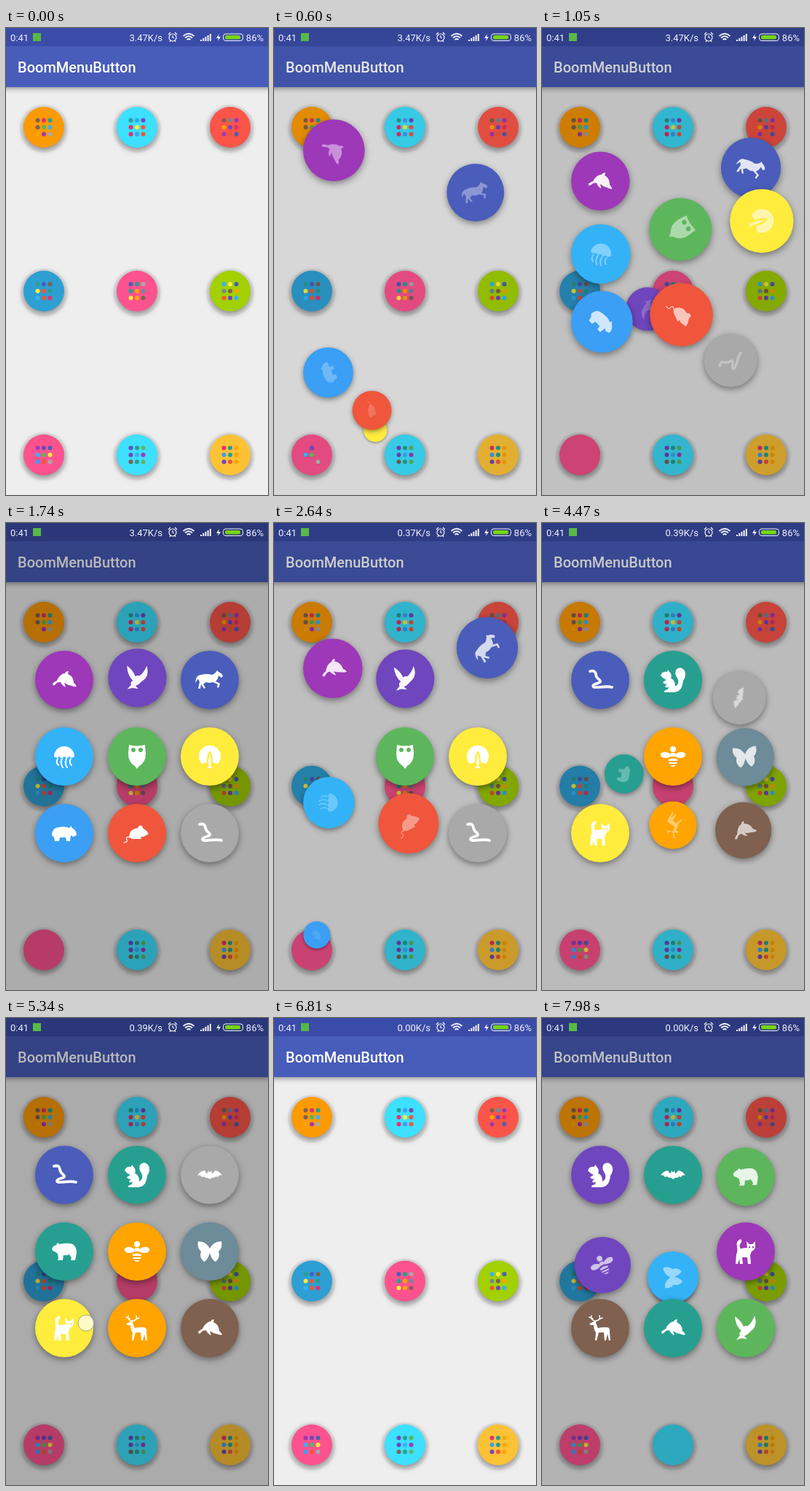
Write an HTML page with a canvas that moves like this. It is 360x640 px and loops after 8000 ms.

```html
<!DOCTYPE html>
<html lang="en">
<head>
<meta charset="utf-8">
<title>Boom menu</title>
<style>
html, body { margin: 0; width: 100%; height: 100%; overflow: hidden; background: #eee; }
canvas { display: block; width: 360px; height: 640px; }
</style>
</head>
<body>
<canvas id="stage"></canvas>
<script>
const LOOP = 8000;
const MAX_DIM = 0.2815;
const canvas = document.getElementById('stage');
const ctx = canvas.getContext('2d');
const ratio = window.devicePixelRatio || 1;
canvas.width = 360 * ratio;
canvas.height = 640 * ratio;

const COLORS = {
  p: '#9d38b8', v: '#7046be', i: '#4a5dbb', l: '#34b2f8', g: '#5db65c', y: '#ffec3d', b: '#3a9ff5',
  r: '#f0563b', a: '#a9a9a9', t: '#279f90', o: '#ffa400', s: '#6d8b98', n: '#80604f', k: '#e4306b'
};

// Each menu button: fill colour and the colours of its nine dots.
const BUTTONS = [
  ['#fc9a05', 'nktnglopa'], ['#3de0ff', 'tbvkyrkbr'], ['#fb5549', 'nspovkpri'],
  ['#2d9fd3', 'tinyrtlrk'], ['#fc538e', 'itatosyon'], ['#a2d000', 'lyisnorvl'],
  ['#fc538e', 'pvilgybra'], ['#3de0ff', 'vtgvlpntg'], ['#fcc236', 'ktobtovro']
].map(([color, dots], n) => ({ color, dots, x: 52 + n % 3 * 128, y: 136 + Math.floor(n / 3) * 224.5 }));

// Each icon: filled outline, stroked outline, stroke width.
const ICONS = {
  dolphin: ['M-17 6Q-13 2-10 1C-7-6-2-9 1-9Q2-12 6-12L5-8C11-6 13 0 13 4Q16 6 17 9Q14 10 10 8Q4 7 0 4L2 10Q-3 8-5 3Q-8 3-10 4Q-12 7-16 8Q-13 5-17 6Z'],
  eagle: ['M-15-16Q-6-10-3-2Q1-4 3-3Q9-8 12-17Q17-3 7 4Q3 9-2 11L2 15-6 14-13 16-8 10Q-10 6-6 4Q-14-3-15-16Z'],
  horse: ['M-20 4Q-19-7-12-7Q-4-9 3-7Q8-9 10-13L12-11Q17-9 18-5L16-3 12-6Q11 0 8 2L14 5 12 11 10 10 11 6 4 3Q0 5-5 3L-9 6-6 11-8 12-12 6-13 12H-16L-14 3Q-16-3-17 0Z'],
  jelly: ['M-14 0A14 14 0 0 1 14 0Q10 3 7 0Q4 4 0 0Q-4 4-7 0Q-10 3-14 0Z',
    'M-9 3Q-12 8-8 12M-3 3Q-6 9-2 15M3 3Q0 9 4 15M9 3Q6 8 10 12', 2],
  owl: ['M-11-16Q0-13 11-16L12-4Q12 8 3 13L0 17-3 13Q-12 8-12-4ZM-8-9a3 3 0 1 0 6 0a3 3 0 1 0-6 0ZM2-9a3 3 0 1 0 6 0a3 3 0 1 0-6 0Z'],
  peacock: ['M-11 10A15 15 0 1 1 11 10L4 8Q4-4 0-8Q-4-4-4 8ZM-2 7Q-1 0 0-5Q1 0 2 7L1 13 4 16H-4L-1 13Z'],
  hippo: ['M-17 3Q-17-7-8-8Q2-10 7-7L9-10 11-7Q17-4 17 3L12 5 9 3 8 11H3L2 6H-6L-7 11H-13L-14 6Z'],
  mouse: ['M-11 5Q-10-6 1-7Q3-12 7-10L8-7Q13-4 16 1L9 5H5L6 8H1L-7 8Z', 'M-10 6Q-16 4-14 9Q-12 12-18 13', 1.2],
  snake: ['', 'M-14-12Q-7-14-6-8Q-6-4-1 0C4 5-9 4-10 8C-10 13 6 7 16 10', 3.8],
  squirrel: ['M-17-6Q-15-12-8-11L-7-14-4-10Q-1-7-3-2C2 0 3 4 3 9C9 6 8 0 5-4C0-13 7-18 12-16C19-13 18-4 14 1C13 9 11 16 2 17L-12 17Q-13 14-7 13L-6 9Q-9 12-11 9L-8 5Q-12 7-14 3L-9 0Q-14-2-17-6Z'],
  bat: ['M-2-6L-1-4H1L2-6 3-2Q6-3 7-6Q14-5 17 1Q13-1 11 3Q8 1 6 4Q3 3 0 6Q-3 3-6 4Q-8 1-11 3Q-13-1-17 1Q-14-5-7-6Q-6-3-3-2Z'],
  bear: ['M-17-4Q-15-8-11-9L-9-12-6-10Q2-12 8-11C15-10 17-4 17 2L15 12H9L10 9 7 4Q3 6-1 5L-2 12H-9L-8 9-9 3Q-12 0-16-1Z'],
  bee: ['M-4-10a4 4 0 1 0 8 0a4 4 0 1 0-8 0ZM-3-3Q-12-9-17-4Q-18 1-12 2Q-6 2-3 0ZM3-3Q12-9 17-4Q18 1 12 2Q6 2 3 0ZM-3-5H3V0H-3ZM-6 4Q0 1 6 4V6H-6ZM-6 8H6L5 10H-5ZM-4 12H4Q0 16-4 12Z'],
  butterfly: ['M0-4Q5-14 16-14Q18-5 12 0Q15 8 8 14Q3 12 0 2Q-3 12-8 14Q-15 8-12 0Q-18-5-16-14Q-5-14 0-4Z'],
  cat: ['M-12-6Q-14-15-7-17Q-4-14-8-10Q-9-6-7-4Q-2-5 2-5L1-14 5-10H9L13-14 13-5Q11-1 8 0L6 5 7 17H3L2 8-5 8-4 17H-8L-9 10-11 17H-14L-13 4Q-11 0-12-6ZM4-7h2v2h-2ZM9-7h2v2h-2Z'],
  deer: ['M-15-6L-9-9Q-8-11-5-10L-6-7-3 0Q4-2 10-1Q14 0 13 6L14 17H12L10 8 8 17H6L5 6H-2L-5 17H-7L-6 6Q-9 2-9-4L-13-4Z',
    'M-8-10Q-14-12-12-17M-10-13L-15-15M-6-10Q1-11-1-17M-2-12L3-14', 1.5]
};
for (const name in ICONS) {
  const [fill, line, width] = ICONS[name];
  ICONS[name] = { fill: new Path2D(fill), line: line && new Path2D(line), width };
}

const outBack = t => 1 + 2.70158 * (t - 1) ** 3 + 1.70158 * (t - 1) ** 2;
const inBack = t => 2.70158 * t ** 3 - 1.70158 * t * t;
const outCubic = t => 1 - (1 - t) ** 3;
const inCubic = t => t ** 3;

// Ranks give the launch order of the nine pieces, in units of step.
const RUNS = [
  {
    button: BUTTONS[6], from: 30, to: 3390,
    icons: 'dolphin eagle horse jelly owl peacock hippo mouse snake'.split(' '),
    open: { at: 185, time: 930, step: 84, ranks: [0, 8, 1, 6, 5, 4, 2, 3, 7], ease: outBack },
    close: { at: 2128, time: 572, step: 63, ranks: [7, 7.8, 6, 1.6, 8.8, 9.8, 0, 2.8, 10.8], ease: inBack }
  },
  {
    button: BUTTONS[4], from: 4080, to: 6150,
    icons: 'snake squirrel bat bear bee butterfly cat deer dolphin'.split(' '),
    open: { at: 4080, time: 300, step: 38, ranks: [3, 0, 6, 8, 1, 4, 2, 7, 5], ease: outCubic },
    close: { at: 5340, time: 430, step: 45, ranks: [4, 2, 7, 0, 5, 8, 3, 1, 6], ease: inCubic }
  },
  {
    button: BUTTONS[7], from: 7370, to: LOOP,
    icons: 'squirrel bat bear bee butterfly cat deer dolphin eagle'.split(' '),
    open: { at: 7370, time: 316, step: 57, ranks: [1, 4, 6, 7, 8, 5, 0, 3, 2], ease: outCubic },
    close: { at: LOOP, time: 400, step: 50, ranks: [0, 1, 2, 3, 4, 5, 6, 7, 8], ease: inCubic }
  }
];
const TOUCHES = [[30, 150, 52, 585], [4080, 90, 180, 360], [5340, 110, 110, 418], [7050, 150, 180, 585]];

const clamp = v => Math.min(1, Math.max(0, v));
const mix = (a, b, u) => a + (b - a) * u;
const dotPlace = (button, n) => [button.x + (n % 3 - 1) * 8.5, button.y + (Math.floor(n / 3) - 1) * 9.5];
const progress = (move, n, now) => clamp((now - move.at - move.ranks[n] * move.step) / move.time);

function disc(x, y, r, color) {
  ctx.beginPath();
  ctx.arc(x, y, Math.max(r, 0), 0, 7);
  ctx.fillStyle = color;
  ctx.fill();
}

function raised(x, y, r, color, scale) {
  ctx.save();
  ctx.shadowColor = 'rgba(0,0,0,.42)';
  ctx.shadowBlur = 9 * scale * ratio;
  ctx.shadowOffsetY = 3 * scale * ratio;
  disc(x, y, r, color);
  ctx.restore();
}

function text(value, x, y, font, align, color) {
  ctx.font = font + ' Roboto, sans-serif';
  ctx.textAlign = align;
  ctx.fillStyle = color;
  ctx.fillText(value, x, y);
}

function drawPage(run) {
  ctx.fillStyle = '#eee';
  ctx.fillRect(0, 0, 360, 640);
  ctx.save();
  ctx.shadowColor = 'rgba(0,0,0,.4)';
  ctx.shadowBlur = 7 * ratio;
  ctx.shadowOffsetY = 2 * ratio;
  ctx.fillStyle = '#485cba';
  ctx.fillRect(-10, 0, 380, 81);
  ctx.restore();
  ctx.fillStyle = '#3b4ca8';
  ctx.fillRect(0, 0, 360, 25);
  text('BoomMenuButton', 16, 61, '500 20px', 'left', '#fff');
  for (const button of BUTTONS) {
    disc(button.x, button.y + 2, 33, 'rgba(0,0,0,.05)');
    raised(button.x, button.y, 28, button.color, 1);
    if (run && run.button === button) continue;
    [...button.dots].forEach((key, n) => disc(...dotPlace(button, n), 3, COLORS[key]));
  }
}

function drawStatus(now) {
  const speed = now < 2400 ? '3.47' : now < 4380 ? '0.37' : now < 6810 ? '0.39' : '0.00';
  const white = '#f2f3fa';
  text('0:41', 6, 17.5, '13px', 'left', white);
  text(speed + 'K/s', 215, 17.5, '13px', 'right', white);
  text('86%', 354, 17.5, '13px', 'right', white);
  ctx.fillStyle = '#58b947';
  ctx.fillRect(37, 7, 11, 11);

  ctx.strokeStyle = white;
  ctx.lineWidth = 1.2;
  ctx.stroke(new Path2D('M234 13a5 5 0 1 0-10 0a5 5 0 1 0 10 0M229 10v3l2 1M223 9l3-3M235 9l-3-3M225 19l1-2M233 19l-1-2'));
  ctx.lineWidth = 1.8;
  ctx.stroke(new Path2D('M243.5 11Q251 4.500 258.500 11M246 13.500Q251 9 256 13.500M248.500 16Q251 14 253.500 16'));
  ctx.fillStyle = white;
  for (let n = 0; n < 5; n++) ctx.fillRect(267 + n * 3.2, 16 - n * 2, 2, 2 + n * 2);
  ctx.fill(new Path2D('M293 8l-4 6h3l-1 4 4-6h-3Z'));
  ctx.lineWidth = 1;
  ctx.beginPath();
  ctx.roundRect(298.5, 8, 27, 9.500, 3.5);
  ctx.stroke();
  ctx.fillStyle = '#76d313';
  ctx.beginPath();
  ctx.roundRect(301, 10, 21, 5.500, 2);
  ctx.fill();
}

function drawPiece(run, n, now) {
  const closing = now >= run.close.at;
  const move = closing ? run.close : run.open;
  const t = progress(move, n, now);
  const u = closing ? 1 - move.ease(t) : move.ease(t);
  const [x0, y0] = dotPlace(run.button, n);
  const x1 = 80 + n % 3 * 100, y1 = 215 + Math.floor(n / 3) * 105;
  const straight = Math.abs(x1 - x0) < 1;
  const x = mix(x0, x1, u), y = mix(y0, y1, straight ? u : u * u);
  const scale = Math.max(mix(0.075, 1, u), 0.01);

  raised(x, y, 40 * scale, COLORS[run.button.dots[n]], scale);
  ctx.save();
  ctx.translate(x, y);
  ctx.scale(scale, scale);
  ctx.rotate((u - 1) * Math.PI * 4 * (closing ? -1 : 1));
  ctx.globalAlpha = closing ? 1 - t : t;
  ctx.fillStyle = ctx.strokeStyle = '#fff';
  const icon = ICONS[run.icons[n]];
  ctx.fill(icon.fill, 'evenodd');
  if (icon.line) {
    ctx.lineWidth = icon.width;
    ctx.lineCap = 'round';
    ctx.stroke(icon.line);
  }
  ctx.restore();
}

function dimLevel(run, now) {
  const closing = now >= run.close.at;
  const move = closing ? run.close : run.open;
  const p = clamp((now - move.at) / (move.time + Math.max(...move.ranks) * move.step));
  return MAX_DIM * (closing ? 1 - p ** 1.4 : 1 - (1 - p) ** 1.4);
}

function draw(now) {
  const run = RUNS.find(r => now >= r.from && now < r.to);
  ctx.setTransform(ratio, 0, 0, ratio, 0, 0);
  drawPage(run);
  if (run) {
    ctx.fillStyle = `rgba(0,0,0,${dimLevel(run, now)})`;
    ctx.fillRect(0, 0, 360, 640);
  }
  drawStatus(now);
  if (run) run.icons.forEach((_, n) => drawPiece(run, n, now));
  for (const [at, time, x, y] of TOUCHES) {
    if (now < at || now >= at + time) continue;
    disc(x, y, 11, 'rgba(255,255,255,.7)');
    ctx.strokeStyle = 'rgba(120,120,120,.6)';
    ctx.lineWidth = 1;
    ctx.stroke();
  }
}

const start = performance.now();
function tick() {
  draw((performance.now() - start) % LOOP);
  requestAnimationFrame(tick);
}
tick();
</script>
</body>
</html>
```
